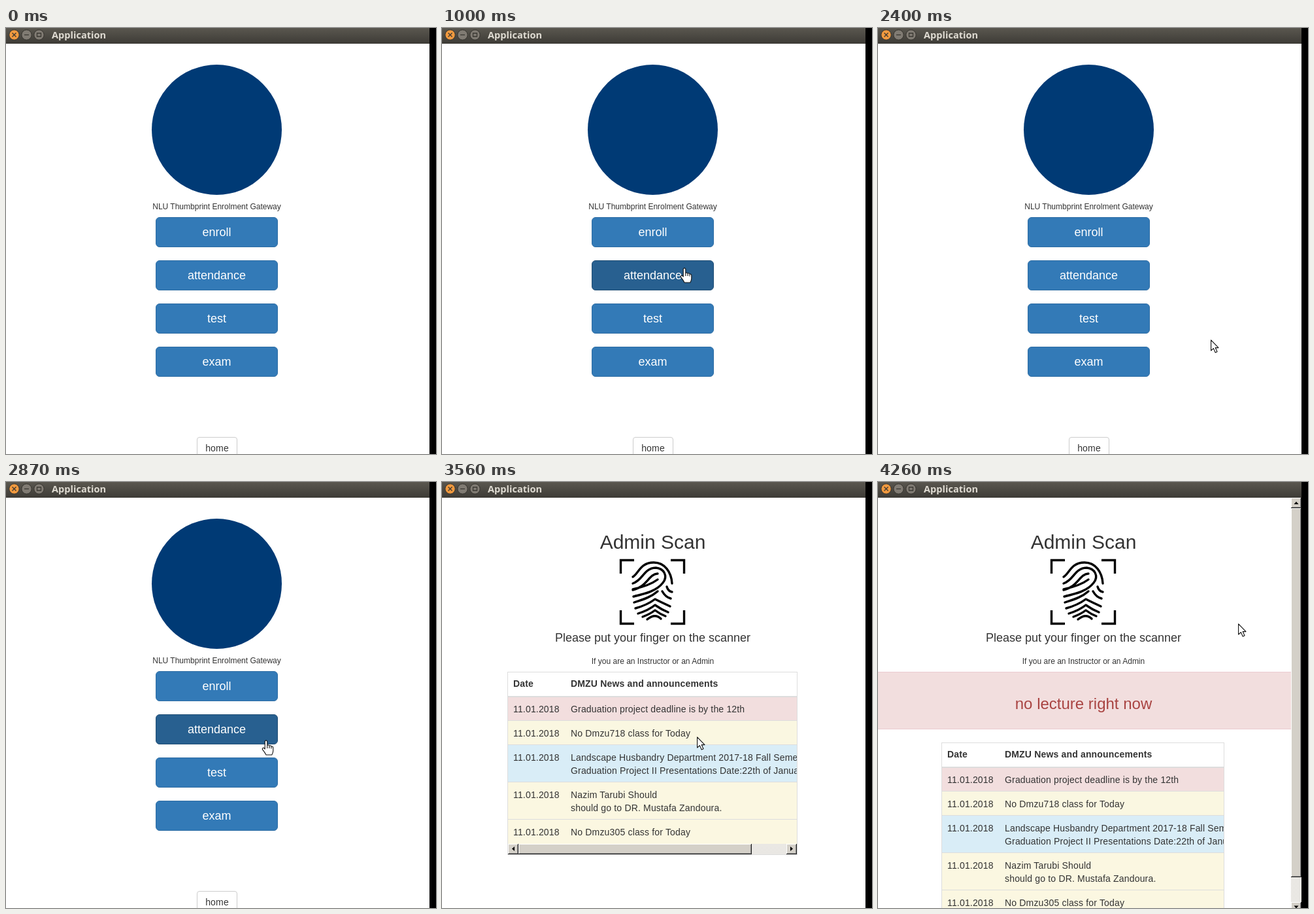
An HTML page for the animation above (8000 ms loop, 658 by 651 pixels).

```html
<!DOCTYPE html>
<html lang="en">
<head>
<meta charset="utf-8">
<title>Application</title>
<style>
html, body { margin: 0; width: 100%; height: 100%; overflow: hidden; background: #fff; }
svg { display: block; width: 658px; height: 651px; }
text { font: 14px "Liberation Sans", Arial, sans-serif; letter-spacing: .17px; fill: #333; white-space: pre; }
.mid { text-anchor: middle; }
.bold { font-weight: 700; }
.s12 { font-size: 12px; letter-spacing: 0; }
.s18 { font-size: 18px; letter-spacing: 0; }
.s24 { font-size: 24px; letter-spacing: 0; fill: #a94442; }
.s30 { font-size: 30px; letter-spacing: 0; }
.on { fill: #fff; }
.title { font: 700 14.6px "Open Sans", "Noto Sans", sans-serif; letter-spacing: 0; fill: #dfdbd2; }
.btn { fill: #337ab7; stroke: #2e6da4; }
.btn.half { fill: #2d6ca3; stroke: #27608c; }
.btn.hover { fill: #286090; stroke: #204d74; }
.btn.active { fill: #204d74; stroke: #122b40; }
.ink { fill: none; stroke: #000; stroke-width: 3.4; }
.ridge { stroke-linecap: round; stroke-linejoin: round; }
.pointer { fill: #fff; stroke: #111; stroke-width: 1.1; stroke-linejoin: round; }
</style>
</head>
<body>
<svg id="stage" viewBox="0 0 658 651"></svg>
<script>
const LOOP = 8000;
const stage = document.getElementById('stage');

const rect = (x, y, w, h, fill, more = '') =>
  `<rect x="${x}" y="${y}" width="${w}" height="${h}" fill="${fill}" ${more}/>`;
const text = (x, y, cls, s) => `<text x="${x}" y="${y}" class="${cls}">${s}</text>`;

// Raised scrollbar part
const bevel = (x, y, w, h) =>
  rect(x, y, w, h, '#202020') + rect(x, y, w - 1, h - 1, '#fff') +
  rect(x + 1, y + 1, w - 2, h - 2, '#888') + rect(x + 1, y + 1, w - 3, h - 3, '#d4d0c8');

const arrowMark = (x, y, turn) =>
  `<path d="M-3.5 2H3.5L0 -2Z" transform="translate(${x} ${y}) rotate(${turn})"/>`;

const bigButton = (label, y, id) =>
  `<rect id="${id}" class="btn" x="229.5" y="${y + .5}" width="186" height="45" rx="5.5"/>` +
  text(322.5, y + 29, 'mid s18 on', label);

const titleBar = () => {
  const knob = (x, fill, mark) =>
    `<circle cx="${x}" cy="10.5" r="7.7" fill="${fill}" stroke="#34322d"/>` +
    `<path d="${mark}" transform="translate(${x} 10.5)" fill="none" stroke="#3a3833" stroke-width="1.3"/>`;
  return rect(0, 0, 648, 24, 'url(#bar)') +
    knob(12.5, '#f29a3f', 'M-3-3L3 3M3-3L-3 3') +
    knob(31.5, '#807b73', 'M-3.5 0H3.5') +
    knob(50.5, '#807b73', 'M-3-2.5H3V2.5H-3Z') +
    text(70, 16, 'title', 'Application');
};

const homePage = () =>
  '<circle cx="322.5" cy="155.5" r="99.5" fill="#003a75"/>' +
  text(322.5, 277, 'mid s12', 'NLU Thumbprint Enrolment Gateway') +
  ['enroll', 'attendance', 'test', 'exam'].map((s, i) => bigButton(s, 289 + i * 66, s)).join('') +
  `<path id="focus" d="M229 355.5H417M229 401.5H417M229.5 355V402M416.5 355V402"
    fill="none" stroke="#000a14" stroke-dasharray="1 1"/>` +
  '<rect x="292.5" y="625.5" width="61" height="33" rx="3.5" fill="#fff" stroke="#ccc"/>' +
  text(323, 647, 'mid', 'home');

const fingerprint = (x, y) => `<g class="ink" transform="translate(${x} ${y})">
  <path d="M1.5 22V1.5H22M78 1.5H98.5V22M98.5 78V98.5H78M22 98.5H1.5V78"/>
  <path class="ridge" d="M20 27C29 22 31 5 52 5C69 5 79 20 80 37M20 37C36 32 36 14 55 13
    M20 47C42 42 44 23 58 22M55 13C68 14 74 26 66 36C56 49 38 53 21 57M21 57L24 56
    M20 46C38 42 50 37 58 31M22 66C38 61 49 57 58 49M24 75Q42 70 54 61Q64 66 77 72
    M28 83Q44 78 54 70Q64 77 74 81M35 88Q46 84 54 78Q62 84 70 87M42 92Q54 82 63 91
    M65 49Q70 58 78 60M72 42Q74 49 80 50"/></g>`;

const rows = [
  ['#f2dede', 'Graduation project deadline is by the 12th'],
  ['#faf7e1', 'No Dmzu718 class for Today'],
  ['#d9edf7', 'Landscape Husbandry Department 2017-18 Fall Semester',
    'Graduation Project II Presentations Date:22th of January'],
  ['#fbf7e1', 'Nazim Tarubi Should', 'should go to DR. Mustafa Zandoura.'],
  ['#fbf7e1', 'No Dmzu305 class for Today']
];

const newsTable = (x, y, w, clip) => {
  let s = text(x + 9, y + 23, 'bold', 'Date') +
    text(x + 97, y + 23, 'bold', 'DMZU News and announcements') +
    rect(x, y + 37, w, 2, '#ddd');
  let top = y + 38;
  rows.forEach(([fill, ...lines], i) => {
    const h = 17 + 20 * lines.length;
    s += rect(x, top + (i ? 0 : 1), w, h, fill);
    if (i) s += rect(x, top - 1, w, 1, '#ddd');
    s += text(x + 9, top + 24, '', '11.01.2018');
    lines.forEach((l, n) => s += text(x + 97, top + 24 + 20 * n, '', l));
    top += h;
  });
  return `<clipPath id="${clip}">${rect(x, y, w, 280, '#000')}</clipPath>` +
    `<g clip-path="url(#${clip})">${s}</g>` +
    rect(x + .5, y + .5, w - 1, 279, 'none', 'stroke="#ddd"');
};

const heading = mid =>
  text(mid, 102, 'mid s30', 'Admin Scan') +
  fingerprint(Math.floor(mid - 50.5), 118) +
  text(mid, 244, 'mid s18', 'Please put your finger on the scanner') +
  text(mid, 278, 'mid s12', 'If you are an Instructor or an Admin');

const scanPage = () =>
  heading(322.5) + newsTable(100, 290, 444, 'clipA') +
  rect(101, 553, 442, 16, 'url(#track)') +
  bevel(101, 553, 16, 16) + arrowMark(109, 560.5, -90) +
  bevel(117, 553, 357, 16) +
  bevel(527, 553, 16, 16) + arrowMark(535, 560.5, 90);

const alertPage = () =>
  heading(314.5) +
  rect(0, 290, 632, 88, '#ebccd1') + rect(0, 291, 632, 86, '#f2dede') +
  text(314.5, 347, 'mid s24', 'no lecture right now') +
  newsTable(97, 398, 433, 'clipB') +
  rect(632, 24, 16, 627, 'url(#track)') +
  bevel(632, 24, 16, 16) + arrowMark(640, 32, 0) +
  bevel(632, 40, 16, 564) +
  bevel(632, 642, 16, 16) + arrowMark(640, 649.5, 180);

stage.innerHTML = `<defs>
  <linearGradient id="bar" x2="0" y2="1">
    <stop stop-color="#5a574f"/><stop offset="1" stop-color="#3d3b36"/>
  </linearGradient>
  <pattern id="track" width="2" height="2" patternUnits="userSpaceOnUse">
    ${rect(0, 0, 2, 2, '#fff')}${rect(0, 0, 1, 1, '#d4d0c8')}${rect(1, 1, 1, 1, '#d4d0c8')}
  </pattern></defs>
  ${rect(0, 0, 658, 651, '#fff')}
  <g id="home">${homePage()}</g>
  <g id="scan">${scanPage()}</g>
  <g id="alert">${alertPage()}</g>
  ${titleBar()}${rect(648, 0, 10, 651, '#000')}
  <g id="cursor" class="pointer">
    <path id="arrow" d="M.6 .8V17L4.4 13.6L7.2 20L10 18.8L7.2 12.6H12Z"/>
    <path id="hand" d="M-1.8 13V1.2Q0 -1.4 1.8 1.2V7.5Q4 6.2 5 8.2Q7 7 8 9Q10.8 8.5 10.8 11.5V16
      Q10.5 19 8.8 22H0Q-2 18 -5.6 13.6Q-6 10.6 -3.4 11.4ZM1.8 7V12M5 8.2V12M8 9V12.5"/>
  </g>`;

const el = id => document.getElementById(id);
const show = (id, on) => el(id).style.display = on ? '' : 'none';

// Pointer moves: start, end, jumps, from, to, ease-out power
const moves = [
  [70, 690, 8, [549, 640], [385, 376], 1.6],
  [690, 840, 2, [385, 376], [371, 367], 1],
  [1850, 2000, 2, [419, 430], [510, 489], 1.5],
  [2150, 2190, 1, [512, 485], [514, 480], 1],
  [2400, 2950, 7, [509, 476], [390, 389], 1.4],
  [3790, 4020, 3, [410, 374], [530, 284], 1.2],
  [4020, 4260, 3, [530, 284], [551, 216], 1.3]
];

function pointerAt(t) {
  const m = moves.filter(v => t >= v[0]).pop();
  if (!m) return null;
  const [a, b, n, p, q, pow] = m;
  const u = Math.min(1, Math.floor((t - a) / (b - a) * n + .06) / n);
  const k = 1 - (1 - u) ** pow;
  return p.map((v, i) => Math.round(v + (q[i] - v) * k));
}

const overButton = ([x, y]) =>
  x >= 229 && x < 416 && y >= 289 && y < 533 && (y - 289) % 66 < 46;

const buttonState = t =>
  t >= 3100 ? 'active' : t >= 2870 ? 'hover' : t >= 1940 ? '' :
  t >= 1000 ? 'hover' : t >= 930 ? 'half' : '';

function draw(t) {
  show('home', t < 3560);
  show('scan', t >= 3560 && t < 4260);
  show('alert', t >= 4260);
  show('focus', t >= 3100);
  el('attendance').setAttribute('class', 'btn ' + buttonState(t));
  const p = pointerAt(t);
  show('cursor', p);
  if (!p) return;
  el('cursor').setAttribute('transform', `translate(${p})`);
  const hand = t < 3480 && overButton(p);
  show('hand', hand);
  show('arrow', !hand);
}

const start = performance.now();
function tick() {
  draw((performance.now() - start) % LOOP);
  requestAnimationFrame(tick);
}
tick();
</script>
</body>
</html>
```
